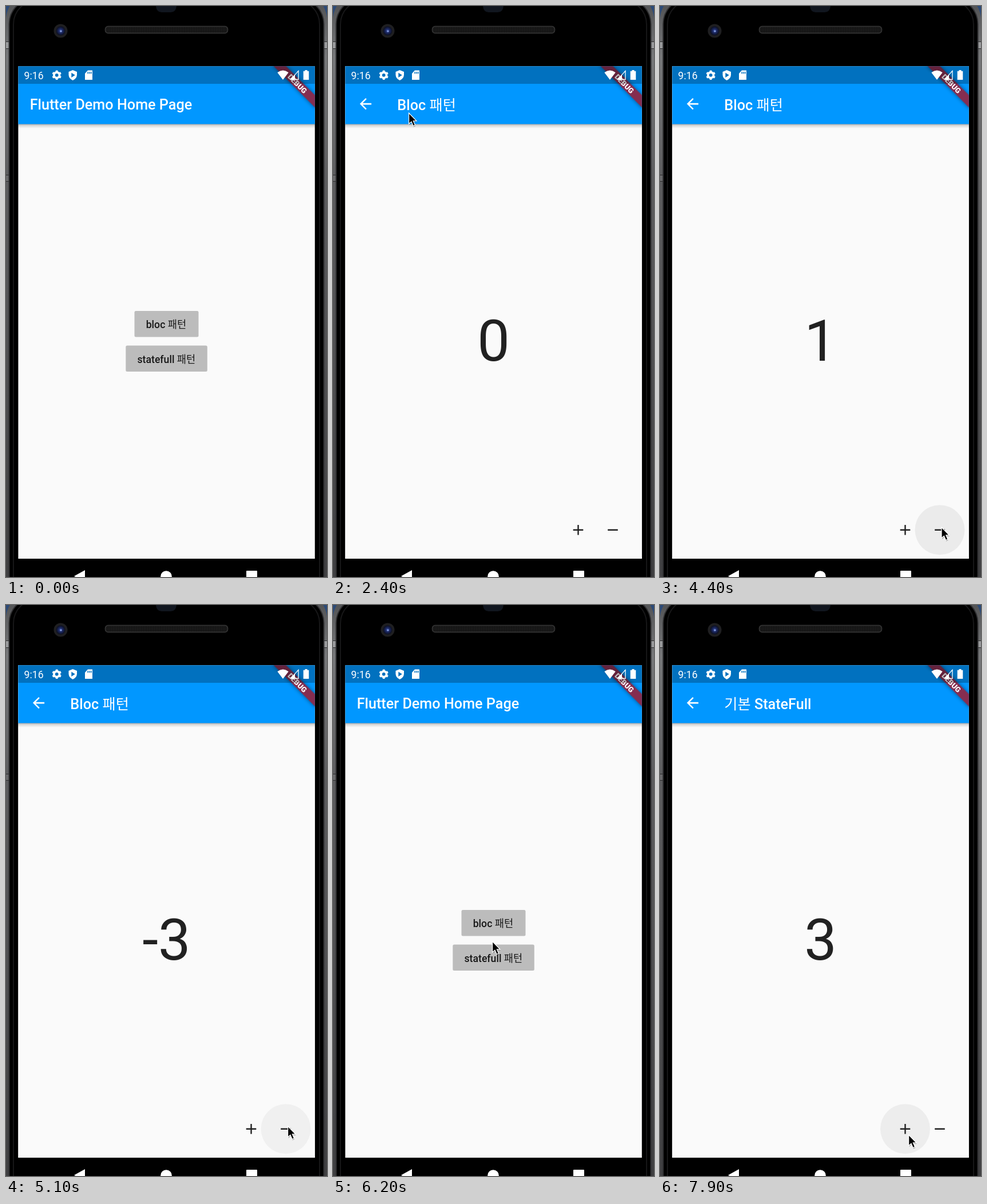
Recreate the animation shown at these times as an HTML page. Size 561 px wide and 998 px high, loop 8 s.

```html
<!DOCTYPE html>
<html lang="ko">
<head>
<meta charset="utf-8">
<title>Counter demo</title>
<style>
  html, body { margin: 0; width: 100%; height: 100%; overflow: hidden; background: #000; }
  svg { display: block; width: 561px; height: 998px; }
  text { font-family: Roboto, "Noto Sans CJK KR", "Noto Sans CJK", sans-serif; }
  .ko { font-family: "Noto Sans CJK KR", "Noto Sans CJK", sans-serif; font-weight: 400; }
  .title { font-size: 25.2px; font-weight: 500; fill: #fff; }
  .label { font-size: 17.64px; font-weight: 500; fill: #181818; }
  .count { font-size: 100.8px; fill: #212121; text-anchor: middle; }
  .ribbon { filter: drop-shadow(0 0 3px rgba(0, 0, 0, .5)); }
</style>
</head>
<body>
<svg viewBox="0 0 561 998">
  <defs>
    <clipPath id="screen"><rect x="21.400" y="105.300" width="518.400" height="860.700"/></clipPath>
    <linearGradient id="metal" x1="0" y1="0" x2="0" y2="1">
      <stop offset="0" stop-color="#4a4b4d"/><stop offset=".1" stop-color="#77787a"/>
      <stop offset=".3" stop-color="#5c5c5e"/><stop offset="1" stop-color="#3c3c3e"/>
    </linearGradient>
    <linearGradient id="shade" x1="0" y1="0" x2="0" y2="1">
      <stop offset="0" stop-opacity=".36"/><stop offset=".35" stop-opacity=".14"/><stop offset="1" stop-opacity="0"/>
    </linearGradient>
    <radialGradient id="lens">
      <stop offset="0" stop-color="#4a63b8"/><stop offset=".45" stop-color="#1b2760"/><stop offset="1" stop-color="#0b0e1c"/>
    </radialGradient>
    <pattern id="mesh" width="3" height="3" patternUnits="userSpaceOnUse">
      <rect width="3" height="3" fill="#101010"/><circle cx="1.5" cy="1.5" r=".9" fill="#292929"/>
    </pattern>
    <g id="bar">
      <rect x="21" y="105" width="519" height="862" fill="#fafafa"/>
      <rect x="21" y="206" width="519" height="8" fill="url(#shade)"/>
      <rect x="21" y="105" width="519" height="101.400" fill="#0197ff"/>
    </g>
  </defs>

  <!-- phone body -->
  <rect width="561" height="998" fill="#2c4a77"/>
  <rect x="0" y="-22" width="561" height="1100" rx="46" fill="url(#metal)"/>
  <g fill="#9a9b9d" stroke="#2a2a2a">
    <rect x="-2" y="62.500" width="8" height="12"/><rect x="555" y="62.500" width="8" height="12"/>
    <rect x="-2" y="295.500" width="8" height="11" fill="#6a6a6c"/>
  </g>
  <rect x="5.500" y="-14" width="550" height="1100" rx="46" fill="#000" stroke="#303032" stroke-width="2"/>
  <rect x="13" y="-10" width="535" height="1100" rx="42" fill="none" stroke="#171718" stroke-width="2"/>
  <path d="M262 0H298Q297 11 288 11H272Q263 11 262 0Z" fill="#11161f"/>
  <rect x="173.500" y="35.500" width="214" height="12" rx="5" fill="url(#mesh)" stroke="#363636" stroke-width="1.500"/>
  <circle cx="95.500" cy="43.500" r="12" fill="#1f1f21"/>
  <circle cx="95.500" cy="43.500" r="8" fill="url(#lens)"/>
  <circle cx="96" cy="44" r="1.500" fill="#8fa6e6"/>
  <g fill="#fff">
    <path d="M119 996.500L138 986V1007Z"/>
    <circle cx="280" cy="997" r="9.800"/>
    <rect x="420" y="987" width="19" height="19" rx="1"/>
  </g>

  <g clip-path="url(#screen)">
    <g id="home">
      <use href="#bar"/>
      <text class="title" x="41.700" y="180.500">Flutter Demo Home Page</text>
      <g fill="#bcbcbc">
        <rect x="224.500" y="533" width="112" height="45.400" rx="2.500"/>
        <rect x="209.300" y="593.500" width="142.500" height="45.400" rx="2.500"/>
      </g>
      <text class="label" x="244.700" y="563">bloc <tspan class="ko">패턴</tspan></text>
      <text class="label" x="229.500" y="623.500">statefull <tspan class="ko">패턴</tspan></text>
    </g>

    <g id="page">
      <use href="#bar"/>
      <path transform="translate(41.900 156) scale(1.260)" fill="#fff"
        d="M20 11H7.830l5.590-5.590L12 4l-8 8 8 8 1.410-1.410L7.830 13H20z"/>
      <text class="title" id="blocTitle" x="112.300" y="182">Bloc <tspan class="ko">패턴</tspan></text>
      <text class="title" id="stateTitle" x="112.300" y="182"><tspan class="ko">기본</tspan> StateFull</text>
      <text class="count" id="count" x="280.500" y="620">0</text>
      <circle id="ripple" cy="915.700" r="43.500"/>
      <path d="M419.700 915.700H437.300M428.500 906.900V924.500M480.200 915.700H497.800" stroke="#212121" stroke-width="2.400"/>
    </g>

    <!-- debug ribbon -->
    <g transform="translate(539.500 105.500) rotate(45) scale(1.260)">
      <rect class="ribbon" x="-42" y="28" width="84" height="12" fill="#852d50"/>
      <text y="37.700" text-anchor="middle" font-size="10.200" font-weight="900" fill="#fff">DEBUG</text>
    </g>

    <!-- status bar -->
    <rect x="21" y="105" width="519" height="31" opacity=".25"/>
    <g fill="#fff">
      <text x="31.500" y="127.500" font-size="17.700">9:16</text>
      <g fill="none" stroke="#fff">
        <circle cx="88.700" cy="120.800" r="4.800" stroke-width="3.800"/>
        <circle cx="88.700" cy="120.800" r="7" stroke-width="2.600" pathLength="12" stroke-dasharray="1 1" stroke-dashoffset="-.5"/>
      </g>
      <path fill-rule="evenodd" d="M116.700 112L124 115V120.500Q123.500 127 116.700 130Q110 127 109.500 120.500V115ZM114.300 116.700V125L120.800 120.800Z"/>
      <path fill-rule="evenodd" d="M143 112.500H151V129H138V118ZM142.500 115V118.500H144V115ZM145.300 115V118.500H146.800V115ZM148 115V118.500H149.500V115Z"/>
      <path d="M484 129L474.300 116.200Q484 108.800 493.700 116.200Z"/>
      <path d="M497.500 128.500L511 113.500V128.500Z" fill="none" stroke="#fff" stroke-width="1.300"/>
      <path d="M497 129L505 120V129Z"/>
      <path d="M522.500 112H526.500V113.700H529.300V129H519.700V113.700H522.500Z"/>
    </g>
  </g>

  <g id="cursor">
    <path d="M1 2V20.500L5.200 16.700L8.300 24L11.800 22.500L8.700 15.500H14.500Z" transform="translate(.5 1.500)" opacity=".25"/>
    <path d="M.600 1V20L5 16.200L8.100 23.500L11.500 22L8.400 14.900H14Z" fill="#000" stroke="#fff" stroke-width="1.200"/>
  </g>
</svg>
<script>
const LOOP = 8000, STEP = 100, SLIDE = 300, RISE = 215;
const $ = id => document.getElementById(id);
const clamp = v => Math.min(1, Math.max(0, v));

// Pointer tip: time, x, y
const path = [
  [100, 540, 8], [400, 330, 470], [500, 292, 581], [700, 283, 566], [800, 283, 566],
  [1200, 264, 558], [1500, 280, 553], [1900, 280, 553], [2400, 132, 186], [2600, 150, 188],
  [2800, 150, 188], [3200, 428, 904], [3600, 428, 904], [3800, 491, 910], [5200, 492, 910],
  [5700, 57, 172], [6000, 57, 172], [6200, 278, 587], [6600, 291, 610], [6900, 291, 610],
  [7300, 434, 925], [8000, 434, 925]
];

// Taps: time, new count, button x, ripple strength
const PLUS = 428.5, MINUS = 489;
const taps = [
  [0, 0, PLUS, 0],
  [3200, 1, PLUS, .06], [3400, 2, PLUS, .07], [3600, 3, PLUS, .072],
  [4200, 2, MINUS, .06], [4400, 1, MINUS, .06], [4700, 0, MINUS, .06],
  [4900, -1, MINUS, .05], [5000, -2, MINUS, .05], [5100, -3, MINUS, .04],
  [6600, 0, PLUS, 0], [7500, 1, PLUS, .05], [7700, 2, PLUS, .05], [7900, 3, PLUS, .05]
];

// Page pushes and pops: start time, direction
const routes = [[-SLIDE, -1], [1850, 1], [5900, -1], [6635, 1]];

function bezier(x1, y1, x2, y2) {
  const at = (a, b, s) => 3 * (1 - s) * s * ((1 - s) * a + s * b) + s ** 3;
  return x => {
    if (x <= 0 || x >= 1) return clamp(x);
    let lo = 0, hi = 1;
    for (let i = 0; i < 24; i++) {
      const mid = (lo + hi) / 2;
      if (at(x1, x2, mid) < x) lo = mid; else hi = mid;
    }
    return at(y1, y2, lo);
  };
}
const fadeIn = bezier(.42, 0, 1, 1);
const slideIn = bezier(.4, 0, .2, 1);

function pointer(t) {
  const i = path.findIndex(p => p[0] > t);
  const [t0, x0, y0] = path[i - 1], [t1, x1, y1] = path[i];
  const u = (t - t0) / (t1 - t0), k = u * u * (3 - 2 * u);
  return [x0 + (x1 - x0) * k, y0 + (y1 - y0) * k];
}

function drawPage(t) {
  const [start, dir] = routes.findLast(r => r[0] <= t);
  const u = clamp((t - start) / SLIDE);
  const shown = dir > 0 ? u : 1 - u;
  $("page").setAttribute("opacity", fadeIn(shown));
  $("page").setAttribute("transform", `translate(0 ${RISE * (1 - slideIn(shown))})`);
  $("page").style.display = shown > 0 ? "" : "none";
  $("blocTitle").style.display = t < 6500 ? "" : "none";
  $("stateTitle").style.display = t < 6500 ? "none" : "";

  const [when, count, x, power] = taps.findLast(p => p[0] <= t);
  $("count").textContent = count;
  $("ripple").setAttribute("cx", x);
  $("ripple").setAttribute("opacity", power * clamp(1 - (t - when) / 400));
}

function draw(t) {
  const visible = t >= path[0][0];
  drawPage(t);
  $("cursor").style.display = visible ? "" : "none";
  if (visible) $("cursor").setAttribute("transform", `translate(${pointer(t)})`);
}

const begin = performance.now();
function tick() {
  const t = Math.floor((performance.now() - begin + 10) / STEP) * STEP % LOOP;
  draw(t);
  requestAnimationFrame(tick);
}
tick();
</script>
</body>
</html>
```
